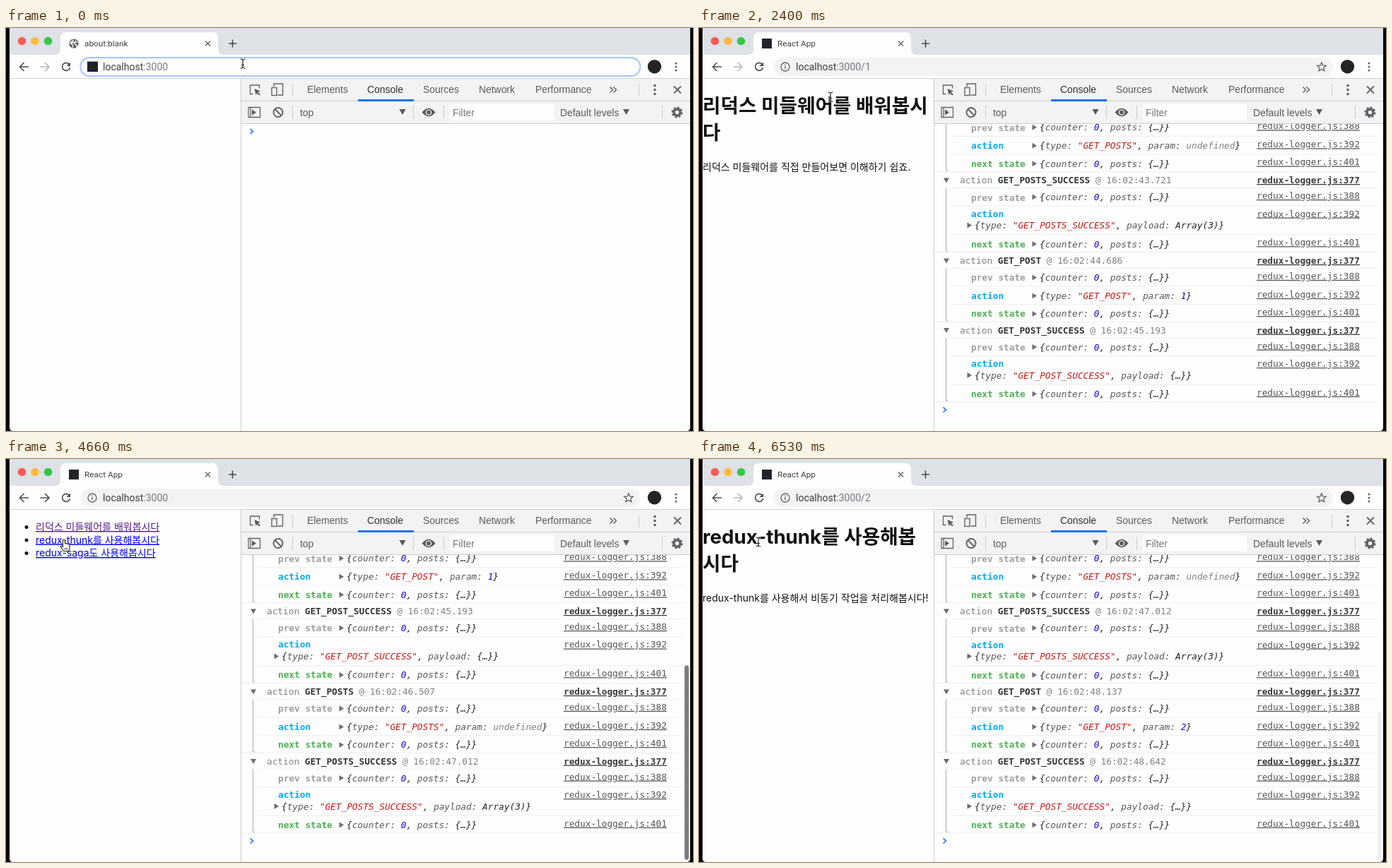
These frames come from a looping animation (972 by 571 pixels, 6560 ms). An HTML page:

```html
<!DOCTYPE html>
<html lang="ko">
<head>
<meta charset="utf-8">
<title>Redux middleware demo</title>
<style>
html, body { margin: 0; width: 100%; height: 100%; overflow: hidden; background: #000; }
svg { display: block; }
text { white-space: pre; }
.ui { font-family: Roboto, sans-serif; fill: #3c4043; }
.tools { font: 13.9px "Liberation Sans", Arial, sans-serif; fill: #5a5a5a; }
.page { font: 14px Inter, "Noto Sans CJK KR", "Noto Sans CJK", sans-serif; fill: #111; }
.page .title { font-size: 27.7px; font-weight: 700; }
.link { fill: #0000ee; text-decoration: underline; }
.link.visited { fill: #551a8b; }
.log { font: 12.76px "DejaVu Sans Mono", "Liberation Mono", monospace; fill: #808080; }
.log .name { font-weight: 700; fill: #303437; }
.log .ref { fill: #545454; text-decoration: underline; }
.log .ref.head { font-weight: 700; fill: #3a3a3a; }
.log .label { font-weight: 700; }
.log .obj { font-style: italic; fill: #222; }
.log .key { fill: #565656; }
.log .num { fill: #1c00cf; }
.log .str { fill: #c41a16; }
.log .undef { fill: #808080; }
.stroke { fill: none; stroke: #5f6368; stroke-width: 1.6; }
</style>
</head>
<body>
<svg width="972" height="571" viewBox="0 0 972 571">
  <defs>
    <clipPath id="frame"><path d="M5 0H968V566Q968 571 963 571H10Q5 571 5 566Z"/></clipPath>
    <clipPath id="view"><rect x="333" y="136" width="635" height="435"/></clipPath>
  </defs>
  <g clip-path="url(#frame)">
    <rect x="5" width="963" height="571" fill="#fefefe"/>

    <!-- tab strip -->
    <rect x="5" width="963" height="38" fill="#dee1e6"/>
    <circle cx="22.5" cy="18.5" r="5.8" fill="#fc5b57"/>
    <circle cx="41" cy="18.5" r="5.8" fill="#fdbc40"/>
    <circle cx="59.5" cy="18.5" r="5.8" fill="#34c84a"/>
    <path d="M69 38Q77 38 77 30V14Q77 6 85 6H292Q300 6 300 14V30Q300 38 308 38Z" fill="#fefefe"/>
    <g id="globe">
      <circle cx="96" cy="22" r="6.6" fill="#55585c"/>
      <path d="M90.5 20.500l4 4v3.200M95 16.500v2.500h-2.500v2h4.500l1 2.500 2 1v2.500M99 17.500l-1 2 3 1" fill="none" stroke="#fefefe" stroke-width="1.5"/>
    </g>
    <path id="spinner" d="M96 16a6 6 0 0 1 6 6" class="stroke" style="stroke:#80868b"/>
    <rect id="favicon" x="89" y="15" width="14" height="14" fill="#20232a"/>
    <text id="tabTitle" class="ui" x="111" y="26" font-size="11.83"></text>
    <path d="M282 18.500l7 7M289 18.500l-7 7" class="stroke" style="stroke-width:1.4"/>
    <path d="M315 22h11M320.500 16.500v11" class="stroke" style="stroke:#45484c"/>

    <!-- address row -->
    <circle id="backHover" cx="25.500" cy="55" r="13" fill="#e6e6e8"/>
    <path d="M32 55H20M25.500 49L19.500 55l6 6" class="stroke" style="stroke:#4a4d51"/>
    <path id="forward" d="M48.500 55H61M55 49l6 6-6 6" class="stroke"/>
    <path d="M89.500 51.500A5.500 5.500 0 1 0 90.500 56" class="stroke" style="stroke:#4a4d51"/>
    <path d="M91 48.500v5.500h-5.500z" fill="#4a4d51"/>
    <rect id="pill" y="42" height="26" rx="13"/>
    <rect id="siteIcon" x="115" y="47.500" width="15" height="14.500" fill="#20232a"/>
    <g id="siteInfo">
      <circle cx="122" cy="55" r="6" class="stroke" style="stroke-width:1.3"/>
      <path d="M122 54v4.300M122 51.500v1.400" class="stroke" style="stroke-width:1.4"/>
      <path d="M12 3.500l2.600 6 6.400.6-4.900 4.200 1.500 6.300L12 17.200l-5.600 3.400 1.500-6.300L3 10.100l6.400-.6z" transform="translate(872.500 46.300) scale(.7)" class="stroke" style="stroke-width:1.9"/>
    </g>
    <text class="ui" x="137" y="59.600" font-size="14" fill="#202124">localhost<tspan id="urlTail" fill="#777b80"></tspan></text>
    <circle cx="917.500" cy="54.700" r="9.700" fill="#252326"/>
    <g fill="#5f6368"><circle cx="948" cy="50" r="1.500"/><circle cx="948" cy="55" r="1.500"/><circle cx="948" cy="60" r="1.500"/></g>
    <path d="M5 71.500H968" stroke="#d2d2d4"/>

    <!-- page -->
    <g class="page">
      <text id="loading" x="5" y="86">로딩중...</text>
      <g id="list">
        <circle cx="29" cy="96.500" r="2.500"/><circle cx="29" cy="115" r="2.500"/><circle cx="29" cy="133.500" r="2.500"/>
        <text id="firstLink" class="link" x="42" y="101">리덕스 미들웨어를 배워봅시다</text>
        <text class="link" x="42" y="119.500">redux-thunk를 사용해봅시다</text>
        <text class="link" x="42" y="138">redux-saga도 사용해봅시다</text>
      </g>
      <g id="post1">
        <text class="title" x="5" y="119.500">리덕스 미들웨어를 배워봅시</text>
        <text class="title" x="5" y="158">다</text>
        <text x="5" y="202">리덕스 미들웨어를 직접 만들어보면 이해하기 쉽죠.</text>
      </g>
      <g id="post2">
        <text class="title" x="5" y="120">redux-thunk를 사용해봅</text>
        <text class="title" x="5" y="158">시다</text>
        <text x="5" y="202">redux-thunk를 사용해서 비동기 작업을 처리해봅시다!</text>
      </g>
    </g>
    <g id="status">
      <path d="M4.500 552.500H96.500Q100.500 552.500 100.500 556.500V572H4.500Z" fill="#fdfdfd" stroke="#bdbdbf"/>
      <text id="statusText" class="ui" x="8" y="566" font-size="12" style="fill:#6a6d71"></text>
    </g>

    <!-- developer tools -->
    <rect x="333" y="72" width="635" height="63" fill="#f3f3f4"/>
    <path d="M332.500 72V571M333 103.500H968M333 135.500H968M405.500 79V97M895.500 79V97M405.500 110V129M576.500 110V129M619.500 110V129M928.500 110V129" stroke="#cccccd"/>
    <rect x="498" y="101" width="79" height="3" fill="#1a73e8"/>
    <rect x="628" y="108" width="147" height="23" fill="#fefefe"/>
    <g class="tools">
      <text x="426" y="92">Elements</text>
      <text x="511" y="92" fill="#303030">Console</text>
      <text x="590" y="92">Sources</text>
      <text x="669" y="92">Network</text>
      <text x="749" y="92">Performance</text>
      <text x="416" y="124.500">top</text>
      <text x="632" y="124.500" fill="#777">Filter</text>
      <text x="784" y="124.500">Default levels</text>
      <path d="M556.500 115h9l-4.500 8zM873 115h9l-4.500 8z"/>
      <circle cx="918" cy="81.500" r="1.700"/><circle cx="918" cy="87.500" r="1.700"/><circle cx="918" cy="93.500" r="1.700"/>
      <path d="M351.500 86l8.500 3.500-3.500 1.300 3.300 3.300-1.500 1.500-3.300-3.300-1.300 3.200z"/>
      <path d="M348 115.500l6 4-6 4z"/>
      <path d="M588.500 119.500Q598 108 607.500 119.500Q598 131 588.500 119.500Z"/>
      <circle cx="598" cy="119.500" r="3.600" fill="none" stroke="#f3f3f4" stroke-width="1.400"/>
    </g>
    <g class="stroke">
      <path d="M349.500 93.500h-4v-12.500h13v4.500" stroke-width="1.300"/>
      <path d="M379 83v-4h12.500v16h-7" stroke-width="1.400"/>
      <rect x="376" y="84.500" width="7" height="11" stroke-width="1.400"/>
      <path d="M343 112.500h16.500v14h-16.500zM346 112.500v14" stroke-width="1.300"/>
      <circle cx="385" cy="119.500" r="6.500" stroke-width="2"/><path d="M380.500 115l9 9" stroke-width="2"/>
      <path d="M854.500 83.500l4 4-4 4M859.500 83.500l4 4-4 4" stroke-width="1.500"/>
      <path d="M945 82.500l10 10M955 82.500l-10 10" stroke-width="1.900"/>
      <circle cx="949.500" cy="119.500" r="4.500" stroke-width="3.600"/>
      <circle cx="949.500" cy="119.500" r="6.800" stroke-width="2.400" stroke-dasharray="3 2.340"/>
    </g>
    <g clip-path="url(#view)">
      <g id="console" class="log"></g>
      <rect id="bar" x="960" width="6" rx="3" fill="#000"/>
    </g>
  </g>

  <g id="cursor" stroke-linejoin="round">
    <g id="ibeam" fill="none">
      <path d="M-3.500-6.500Q0-6.500 0-4Q0-6.500 3.500-6.500M0-4V4M-3.500 6.500Q0 6.500 0 4Q0 6.500 3.500 6.500M-2 2H2" stroke="#fff" stroke-width="2.600" opacity=".7"/>
      <path d="M-3.500-6.500Q0-6.500 0-4Q0-6.500 3.500-6.500M0-4V4M-3.500 6.500Q0 6.500 0 4Q0 6.500 3.500 6.500M-2 2H2" stroke="#222" stroke-width="1.200"/>
    </g>
    <path id="arrow" d="M0 0V13L3-.1 3 10.200 5.400 15.500 7.700 14.500 5.400 9.400H9.500Z" fill="#000" stroke="#fff" stroke-width="1.100" paint-order="stroke"/>
    <path id="hand" d="M-1.500 1Q0-1 1.500 1V6Q3 4.800 4 6.300Q5.500 5.300 6.300 7Q8 6.200 8 8.500V11Q8 14 6.500 16.500H-.5Q-1.500 14-4.800 10.300Q-4.800 8-1.500 10.500ZM1.700 12v2.500M4 12v2.500" fill="#fff" stroke="#222" stroke-width="1.100"/>
  </g>
</svg>
<script>
const LOOP = 6560;
const ACTION_H = 98.7, SUCCESS_H = 113.9;
const $ = id => document.getElementById(id);

// [action, clock, argument, value class, value]
const entries = [
  ['GET_POSTS', '43.211', 'param', 'undef', 'undefined'],
  ['GET_POSTS_SUCCESS', '43.721', 'payload', 'obj', 'Array(3)'],
  ['GET_POST', '44.686', 'param', 'num', '1'],
  ['GET_POST_SUCCESS', '45.193', 'payload', 'obj', '{…}'],
  ['GET_POSTS', '46.507', 'param', 'undef', 'undefined'],
  ['GET_POSTS_SUCCESS', '47.012', 'payload', 'obj', 'Array(3)'],
  ['GET_POST', '48.137', 'param', 'num', '2'],
  ['GET_POST_SUCCESS', '48.642', 'payload', 'obj', '{…}']
];

const span = (cls, s) => `<tspan class="${cls}">${s}</tspan>`;
const text = (cls, x, y, s, fill) =>
  `<text class="${cls}" x="${x}" y="${y + 4.5}"${fill ? ` style="fill:${fill}"` : ''}>${s}</text>`;
const ref = (y, line, cls = '') => text('ref ' + cls, 789, y, 'redux-logger.js:' + line);
const object = (x, y, s) =>
  `<path d="M${x - 10.5} ${y - 4}l6.500 4-6.500 4z" fill="#6e6e6e"/>` + text('obj', x, y, s);
const rule = (x, y) => `<path d="M${x} ${y}H958" stroke="#ededed"/>`;

function group([name, clock, arg, cls, value], y) {
  const wide = arg === 'payload';
  const [act, obj, next] = wide ? [47.5, 64, 90.5] : [50, 50, 75.5];
  const state = `{${span('key', 'counter:')} ${span('num', 0)}, ${span('key', 'posts:')} {…}}`;
  const payload = `{${span('key', 'type:')} ${span('str', `"${name}"`)}, ${span('key', arg + ':')} ${span(cls, value)}}`;
  const end = next + 11.5;
  return `<g transform="translate(0 ${y})">
    <path d="M346-3h8l-4 7z" fill="#6e6e6e"/>
    <path d="M352 ${end - 1.5}h-2.500V11" fill="none" stroke="#a8a8a8"/>
    ${text('', 369, 0, `action ${span('name', name)} @ 16:02:${clock}`)}
    ${ref(0, 377, 'head')}${rule(356, 11)}
    ${text('label', 385, 24.5, 'prev state', '#9e9e9e')}${object(482, 24, state)}
    ${ref(22, 388)}${rule(356, 36.5)}
    ${text('label', 385, act, 'action', '#03a9f4')}${object(wide ? 390 : 482, obj, payload)}
    ${ref(wide ? 47.5 : 48, 392)}${rule(356, next - 13.2)}
    ${text('label', 385, next, 'next state', '#4caf50')}${object(482, next, state)}
    ${ref(next - 2.3, 401)}${rule(333, end)}
  </g>`;
}

// tops[n] is where the line after n groups begins
const tops = [147.5];
$('console').innerHTML = entries.map((e, i) => {
  tops.push(tops[i] + (i % 2 ? SUCCESS_H : ACTION_H));
  return group(e, tops[i]);
}).join('') + '<path id="prompt" d="M345.500-4l4 3.700-4 3.700" fill="none" stroke="#3b82e8" stroke-width="1.800"/>';
const groups = [...$('console').querySelectorAll('g')];

// Hard changes: [time, value]
const pages = [[0, ''], [400, 'loading'], [910, 'list'], [1860, 'loading'], [2370, 'post1'],
  [3660, 'loading'], [4200, 'list'], [5330, 'loading'], [5830, 'post2']];
const counts = [[0, 0], [400, 1], [910, 2], [1900, 3], [2400, 4], [3730, 5], [4200, 6], [5360, 7], [5830, 8]];
const tails = [[0, ':3000'], [1900, ':3000/1'], [3730, ':3000'], [5360, ':3000/2']];
const titles = [[0, 'about:blank'], [130, 'localhost:3000'], [400, 'React App']];
const cursors = [[0, 'ibeam'], [1270, 'arrow'], [1440, 'hand'], [1860, 'arrow'], [2370, 'ibeam'],
  [2900, 'arrow'], [4610, 'hand'], [5330, 'arrow'], [5830, 'ibeam']];

// Pointer stops: [time, x, y]
const path = [[0, 335, 50.5], [760, 335, 50.5], [1030, 304, 56], [1200, 304, 56], [1530, 186, 101],
  [1830, 186, 97.5], [2660, 186, 97.5], [3260, 30.5, 61], [4530, 30.5, 61], [4660, 82, 114],
  [5160, 84, 117.5], [LOOP, 84, 117.5]];

// Shown from, faded from
const bars = [[2430, 2930], [3730, 4730], [5360, 6360]];

const at = (steps, t) => steps.filter(s => s[0] <= t).pop()[1];
const ramp = (t, a, b) => Math.min(1, Math.max(0, (t - a) / (b - a)));
const show = (id, on) => { $(id).style.display = on ? '' : 'none'; };

function pointer(t) {
  const i = path.findIndex(p => p[0] > t);
  const [t0, x0, y0] = path[i - 1], [t1, x1, y1] = path[i];
  const u = ramp(t, t0, t1), k = u * u * (3 - 2 * u);
  return `translate(${x0 + (x1 - x0) * k} ${y0 + (y1 - y0) * k})`;
}

function drawConsole(t) {
  const n = at(counts, t), end = tops[n] - 0.7;
  const scroll = Math.max(0, end - 541.3);
  groups.forEach((g, i) => { g.style.display = i < n ? '' : 'none'; });
  $('prompt').setAttribute('transform', `translate(0 ${end})`);
  $('console').setAttribute('transform', `translate(0 ${-scroll})`);

  const height = 430 * 435 / (435 + scroll);
  const live = bars.find(([from, fade]) => t >= from && t < fade + 190);
  $('bar').setAttribute('y', 568 - height);
  $('bar').setAttribute('height', height);
  $('bar').setAttribute('opacity', live ? 0.5 * (1 - ramp(t, live[1], live[1] + 190)) : 0);
}

function drawBrowser(t) {
  const typing = t < 130, loaded = t >= 400;
  show('globe', typing);
  show('spinner', !typing && !loaded);
  show('favicon', loaded);
  show('siteIcon', typing);
  show('siteInfo', !typing);
  $('spinner').setAttribute('transform', `rotate(${-0.6 * t} 96 22)`);
  $('tabTitle').textContent = at(titles, t);
  $('urlTail').textContent = at(tails, t);

  const pill = $('pill');
  pill.setAttribute('x', typing ? 105.3 : 106);
  pill.setAttribute('width', typing ? 792 : 791);
  pill.setAttribute('fill', typing ? '#fefefe' : '#f1f3f4');
  pill.setAttribute('stroke', typing ? '#a3c5fa' : 'none');
  pill.setAttribute('stroke-width', 2);
  show('backHover', t >= 3660 && t < 4560);
  $('forward').style.stroke = t >= 3730 && t < 5360 ? '#4a4d51' : '#b4b7bb';
}

function drawPage(t) {
  const page = at(pages, t);
  for (const id of ['loading', 'list', 'post1', 'post2']) show(id, id === page);
  $('firstLink').classList.toggle('visited', t >= 1860);

  const first = t < 3000;
  $('statusText').textContent = 'localhost:3000/' + (first ? 1 : 2);
  $('status').setAttribute('opacity', first
    ? ramp(t, 1560, 1830) - ramp(t, 2200, 2330)
    : ramp(t, 4760, 5100) - ramp(t, 5630, 5760));
}

function draw(now) {
  const t = now % LOOP;
  drawBrowser(t);
  drawPage(t);
  drawConsole(t);
  const kind = at(cursors, t);
  for (const id of ['ibeam', 'arrow', 'hand']) show(id, id === kind);
  $('cursor').setAttribute('transform', pointer(t));
  requestAnimationFrame(draw);
}
draw(0);
</script>
</body>
</html>
```
